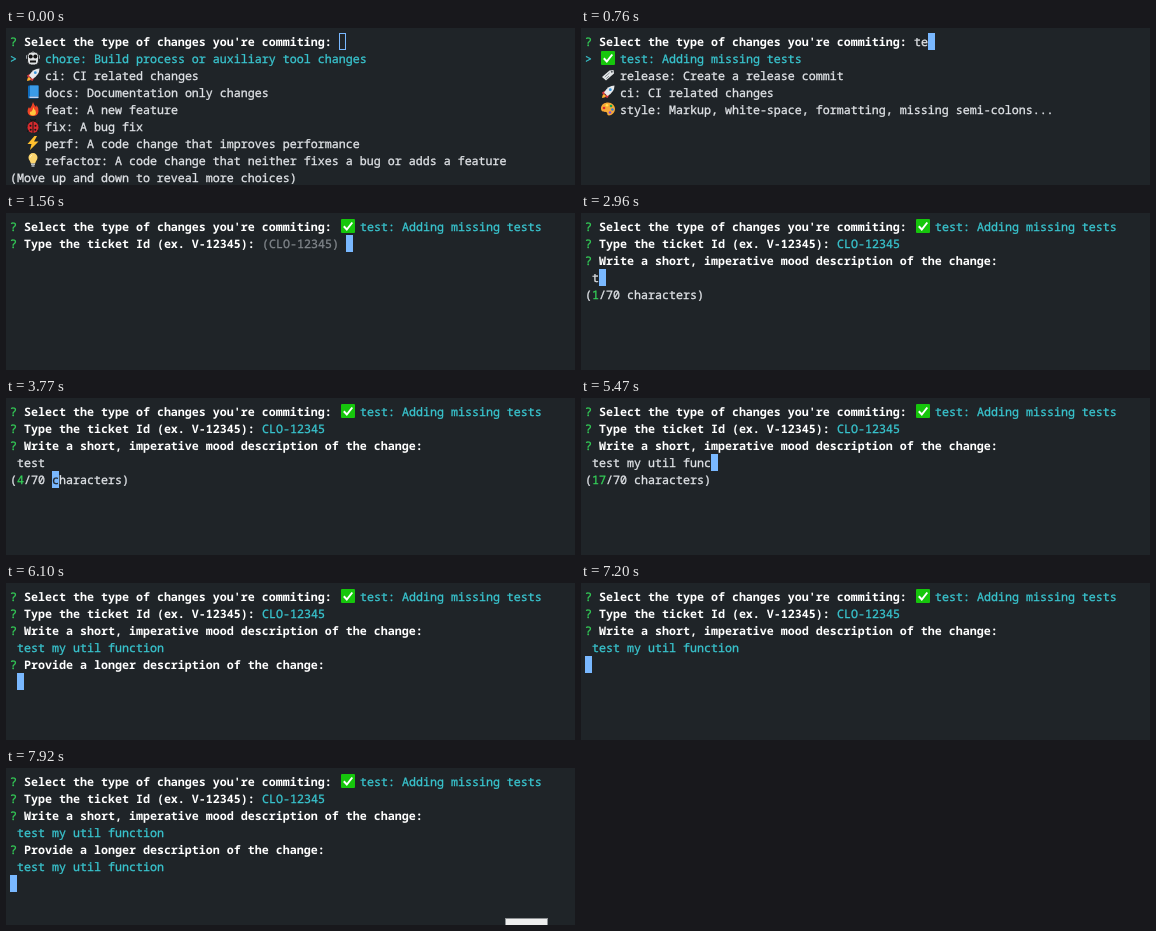
An HTML page for the animation above (8.04 s loop, 569 px wide and 157 px high).

```html
<!DOCTYPE html>
<html lang="en">
<head>
<meta charset="utf-8">
<title>Commit prompt</title>
<style>
  html, body { margin: 0; width: 100%; height: 100%; overflow: hidden; background: #1f2428; }
  svg { display: block; }
  text {
    font: 11.667px "Noto Sans Mono", "DejaVu Sans Mono", monospace;
    text-rendering: geometricPrecision; white-space: pre;
    color: #e1e4e8; fill: currentColor; stroke: currentColor; stroke-width: .3px;
  }
  .bold { font-weight: 700; color: #fff; stroke: none; }
  .cyan { color: #39c5cf; }
  .green { color: #34d058; }
  .dim { color: #81868b; }
  .under { color: #1f2428; }
  .cursor { fill: #79b8ff; }
  .hollow { fill: none; stroke: #79b8ff; }
</style>
</head>
<body>
<svg width="569" height="157" viewBox="0 0 569 157">
  <defs>
    <g id="chore">
      <path d="M7 0v2" stroke="#ddd"/>
      <rect x="0" y="4" width="14" height="4" rx="1" fill="#a3a9ae"/>
      <rect x="1.5" y="1" width="11" height="13" rx="4" fill="#dfe2e4" stroke="#0c0e10" stroke-width=".8"/>
      <circle cx="4.7" cy="5.5" r="2" fill="#111"/><circle cx="9.3" cy="5.5" r="2" fill="#111"/>
      <path d="M4 10.500h6" stroke="#111" stroke-width="2"/>
    </g>
    <g id="ci">
      <path d="M4.500 5.500 1 7.500l1 2.500 3-1zM8.500 9.500l-2 3.500-2.500-1 1-3z" fill="#d5393f"/>
      <path d="M1 13q0-3 2-4l2 2q-1 2-4 2" fill="#ffb02e"/>
      <path d="M13.500.5Q7 .5 3 7.500L6.500 11Q13.500 7 13.500.5" fill="#e6e9ec"/>
      <circle cx="9.300" cy="4.700" r="1.400" fill="#3a96dd"/>
    </g>
    <g id="docs">
      <rect x="2" y=".5" width="10.500" height="13" rx="1" fill="#0f6cbd"/>
      <path d="M4 .5h8.500v10.500H4z" fill="#3a9be8"/>
      <path d="M3.500 12.200h9" stroke="#eef" stroke-width="1.200"/>
    </g>
    <g id="feat">
      <path d="M7 0q1 3 3 5 .5-1 .5-2Q13 6 12.500 9.500 12 14 7 14T1.500 9.500Q1.500 7 3 5q.5 1 1 1.500Q6 4 7 0" fill="#ee4326"/>
      <path d="M7.500 5q0 2 2 3.500Q11 13.500 7 13.500T4 9.500q.5 0 1 .5 2-2 2.500-5" fill="#ffc83d"/>
    </g>
    <g id="fix">
      <path d="M1 3.500 13 12.500M13 3.500 1 12.500M.5 8h13M4.500 0 6 3M9.500 0 8 3" stroke="#101010"/>
      <circle cx="7" cy="3" r="2.500" fill="#161616"/>
      <ellipse cx="7" cy="8.300" rx="5.500" ry="5.700" fill="#d92b2f"/>
      <path d="M7 3v11" stroke="#161616"/>
      <g fill="#161616"><circle cx="4.500" cy="6.800" r="1"/><circle cx="9.500" cy="6.800" r="1"/><circle cx="4.700" cy="10.700" r="1"/><circle cx="9.300" cy="10.700" r="1"/></g>
    </g>
    <path id="perf" d="M8.500 0 1.500 8h4L4 14l8.500-8.500H8L11 0z" fill="#ffc02e"/>
    <g id="refactor">
      <path d="M7 0a4.500 4.500 0 0 1 4.500 4.700C11.500 7 9.500 8 9.200 10.500H4.800C4.500 8 2.500 7 2.500 4.700A4.500 4.500 0 0 1 7 0" fill="#fbd56e"/>
      <path d="M5 11.200h4M5.500 13h3" stroke="#b9bec2" stroke-width="1.400"/>
      <path d="M4.200 4.500q.3-2 2-2.500" stroke="#fff3c4" fill="none"/>
    </g>
    <g id="test">
      <rect width="14" height="14" rx="1" fill="#16c60c"/>
      <path d="m2.800 7.300 3 3.200 5.500-7" fill="none" stroke="#fff" stroke-width="2"/>
    </g>
    <g id="release">
      <path d="M1 9 8.500 2.500l4-.5.5 3.500L5 12.500z" fill="#e3e6e8"/>
      <path d="m3.800 9 4.800-4.200M5.200 10.600 8 8.200" stroke="#858b90"/>
      <circle cx="10.800" cy="3.800" r="1" fill="#555b60"/>
    </g>
    <g id="style">
      <path d="M7 .5C11 .5 14 3.500 14 7s-3 6.500-6 6.500c-2.500 0-1-2.500-2.500-3.200S0 10.500 0 6.500 3.500.5 7 .5" fill="#f7a836"/>
      <circle cx="3" cy="6" r="1.300" fill="#d92b2f"/><circle cx="6" cy="3.300" r="1.300" fill="#ffe14d"/>
      <circle cx="10" cy="4" r="1.300" fill="#16a34a"/><circle cx="11.400" cy="7.500" r="1.300" fill="#2f7fe0"/>
      <circle cx="9" cy="10.500" r="1.300" fill="#8a4bd0"/>
    </g>
  </defs>
  <g id="screen"></g>
</svg>
<script>
const LOOP = 8040, CELL = 7, LINE = 17, LEFT = 4, TOP = 5;
const x = col => LEFT + col * CELL;
const y = row => TOP + row * LINE;

const text = (row, col, str, cls = "") =>
  `<text x="${x(col)}" y="${y(row) + 12.5}" class="${cls}">${str}</text>`;
const icon = (name, row, col) => `<use href="#${name}" x="${x(col) + 2}" y="${y(row) + 1}"/>`;
const cursor = (row, col, under = "") =>
  `<rect x="${x(col)}" y="${y(row)}" width="7" height="17" class="cursor"/>` + text(row, col, under, "under");
const hollowCursor = (row, col) =>
  `<rect x="${x(col) + .5}" y="${y(row) + .5}" width="6" height="16" class="hollow"/>`;
const ask = (row, message) => text(row, 0, "?", "green") + text(row, 2, message, "bold");

const TYPES = {
  chore: "Build process or auxiliary tool changes",
  ci: "CI related changes",
  docs: "Documentation only changes",
  feat: "A new feature",
  fix: "A bug fix",
  perf: "A code change that improves performance",
  refactor: "A code change that neither fixes a bug or adds a feature",
  release: "Create a release commit",
  style: "Markup, white-space, formatting, missing semi-colons...",
  test: "Adding missing tests"
};
const label = name => `${name}: ${TYPES[name]}`;

const frames = [];
const at = (time, ...parts) => frames.push({ time, markup: parts.join("") });

// Step 1: searchable list of change types
const selectAsk = ask(0, "Select the type of changes you're commiting:");
const list = (names, more) => names.split(" ").map((name, i) =>
  icon(name, i + 1, 2) + text(i + 1, 5, label(name), i ? "" : "cyan")).join("") +
  text(1, 0, "&gt;", "cyan") +
  (more ? text(8, 0, "(Move up and down to reveal more choices)") : "");
const search = (query, choices) =>
  selectAsk + text(0, 47, query) + cursor(0, 47 + query.length) + choices;

const allTypes = list("chore ci docs feat fix perf refactor", true);
const matchesT = list("test style feat refactor ci release docs", true);
at(0, selectAsk, hollowCursor(0, 47), allTypes);
at(330, search("", allTypes));
at(540, search("t", matchesT));
at(690, search("te", matchesT));
at(760, search("te", list("test release ci style")));
at(840, search("tes", list("test release")));
at(1160, search("test", list("test")));

// Step 2: ticket id
const selected = selectAsk + icon("test", 0, 47) + text(0, 50, label("test"), "cyan");
const ticketAsk = selected + ask(1, "Type the ticket Id (ex. V-12345):");
const ticketDone = ticketAsk + text(1, 36, "CLO-12345", "cyan");
at(1560, ticketAsk, text(1, 36, "(CLO-12345)", "dim"), cursor(1, 48));
at(2110, ticketDone, cursor(2, 0));

// Step 3: short description with a counter; the cursor sometimes dips to the counter line
const SUBJECT = "test my util function";
const subjectAsk = ticketDone + ask(2, "Write a short, imperative mood description of the change:");
const typed = (time, length, dipped = false) => {
  const value = SUBJECT.slice(0, length);
  const count = String(value.trim().length);
  const hint = `(${count}/70 characters)`;
  const col = length + 1;
  at(time, subjectAsk, text(3, 1, value),
    text(4, 0, "("), text(4, 1, count, "green"), text(4, 1 + count.length, "/70 characters)"),
    dipped ? cursor(4, col, hint[col] || "") : cursor(3, col));
};
[[2180, 0], [2960, 1], [3210, 2], [3360, 3],
 [3530, 3, true], [3610, 4], [3690, 5], [3760, 5, true], [3840, 6], [3920, 7],
 [4150, 8], [4450, 9], [4610, 9, true], [4680, 10],
 [4840, 11], [4920, 12], [5000, 13], [5080, 14], [5160, 14, true], [5240, 15], [5320, 16],
 [5470, 17], [5640, 18], [5730, 19], [5870, 20], [5950, 21], [6020, 21, true]
].forEach(step => typed(...step));

// Step 4: longer description
const subjectDone = subjectAsk + text(3, 1, SUBJECT, "cyan");
const bodyAsk = subjectDone + ask(4, "Provide a longer description of the change:");
const bodyDone = bodyAsk + text(5, 1, SUBJECT, "cyan") + cursor(6, 0);
const tab = fill => `<rect x="499.5" y="150.5" width="42" height="9" fill="${fill}" stroke="#8d9194"/>`;
at(6100, bodyAsk, cursor(5, 1));
at(7200, subjectDone, cursor(4, 0));
at(7270, bodyAsk, text(5, 1, SUBJECT), cursor(5, 22));
at(7610, subjectDone, cursor(4, 0));
at(7670, bodyDone);
at(7840, bodyDone, tab("#a4a7a9"));
at(7920, bodyDone, tab("#eeeeee"));

const screen = document.getElementById("screen");
const start = performance.now();
let shown = null;
function draw() {
  const now = (performance.now() - start) % LOOP;
  const frame = frames.findLast(f => f.time <= now);
  if (frame !== shown) {
    screen.innerHTML = frame.markup;
    shown = frame;
  }
  requestAnimationFrame(draw);
}
draw();
</script>
</body>
</html>
```
